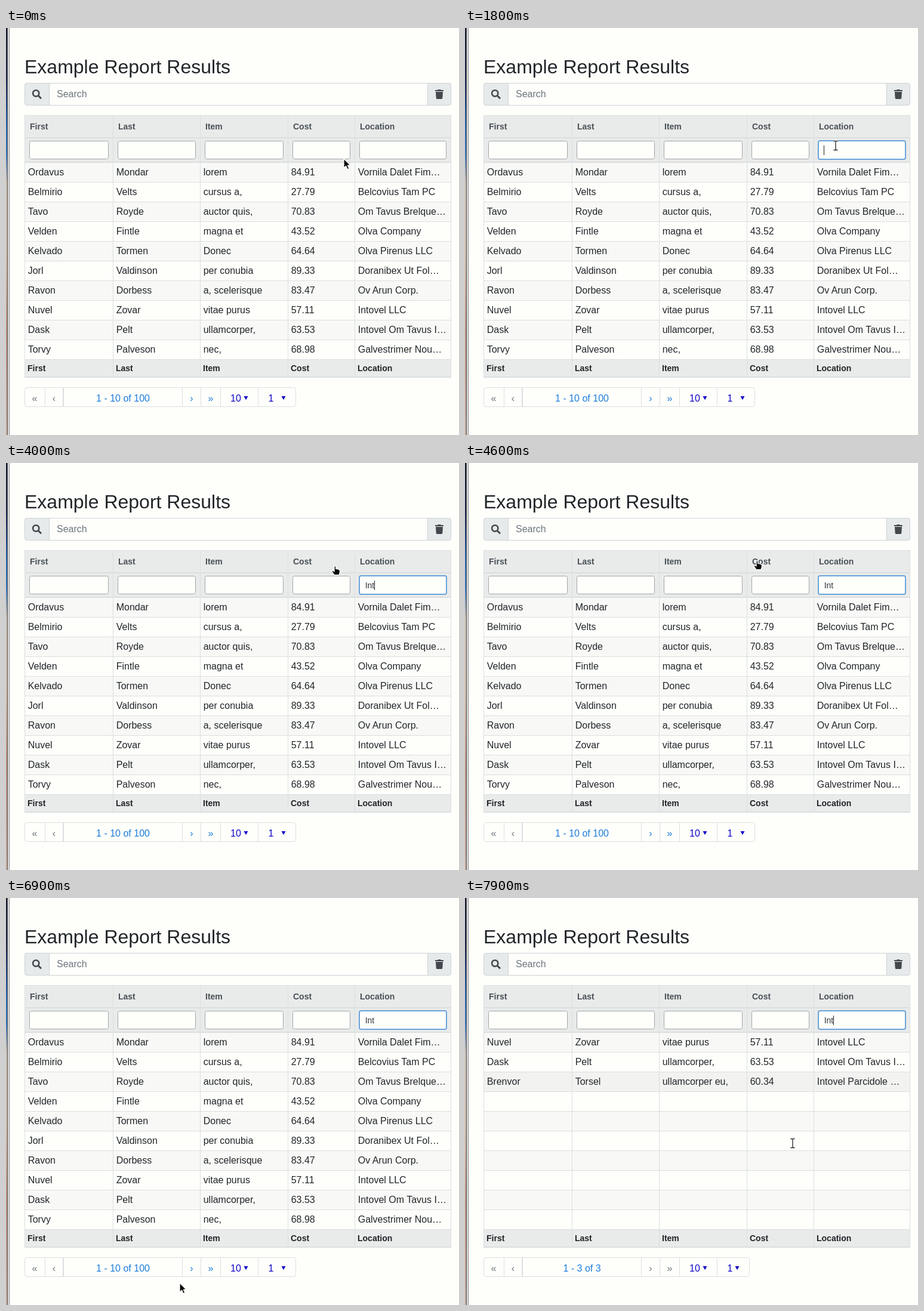
These frames come from a looping animation (759 by 682 pixels, 8000 ms). An HTML page:

```html
<!DOCTYPE html>
<html lang="en">
<head>
<meta charset="utf-8">
<title>Report table</title>
<style>
html, body { margin: 0; width: 100%; height: 100%; overflow: hidden; background: #fefffb; }
svg { display: block; width: 759px; height: 682px; font: 16px "Liberation Sans", Arial, sans-serif; fill: #212529; }
.line { fill: none; stroke: #dbdfe0; }
.shade { fill: #e9ebea; }
.icon { fill: #43484d; }
.title { font-size: 32px; }
.head { font-size: 14px; font-weight: bold; fill: #495057; }
.foot { font-size: 14px; font-weight: bold; }
.typed { font-size: 14px; fill: #33383d; }
.muted { fill: #6c757d; }
.link { fill: #1c7cdb; }
.pick { fill: #1206c8; }
.box { fill: #fefffb; stroke: #a3a6a8; }
.ring { fill: #fefffb; stroke: #6ba4da; stroke-width: 2; }
.mid { text-anchor: middle; }
</style>
</head>
<body>
<svg id="stage" viewBox="0 0 759 682">
  <defs>
    <linearGradient id="desk" x2="0" y2="1">
      <stop offset="0" stop-color="#1c2036"/>
      <stop offset=".12" stop-color="#20294c"/>
      <stop offset=".24" stop-color="#2b67b4"/>
      <stop offset=".31" stop-color="#3b78bd"/>
      <stop offset=".38" stop-color="#c9b9ab"/>
      <stop offset=".55" stop-color="#d5b8a0"/>
      <stop offset=".75" stop-color="#b98e7a"/>
      <stop offset="1" stop-color="#c4a594"/>
    </linearGradient>
  </defs>
</svg>
<script>
const stage = document.getElementById("stage");
const LOOP = 8000;
const HEADINGS = ["First", "Last", "Item", "Cost", "Location"];
const EDGES = [31, 179, 325, 472, 584, 745];
const FIELDS = [[39, 172], [187, 318], [333, 465], [480, 577], [592, 738]];
const PEOPLE = [
  "Ordavus|Mondar|lorem|84.91|Vornila Dalet Fim…",
  "Belmirio|Velts|cursus a,|27.79|Belcovius Tam PC",
  "Tavo|Royde|auctor quis,|70.83|Om Tavus Brelque…",
  "Velden|Fintle|magna et|43.52|Olva Company",
  "Kelvado|Tormen|Donec|64.64|Olva Pirenus LLC",
  "Jorl|Valdinson|per conubia|89.33|Doranibex Ut Fol…",
  "Ravon|Dorbess|a, scelerisque|83.47|Ov Arun Corp.",
  "Nuvel|Zovar|vitae purus|57.11|Intovel LLC",
  "Dask|Pelt|ullamcorper,|63.53|Intovel Om Tavus I…",
  "Torvy|Palveson|nec,|68.98|Galvestrimer Nou…",
  "Brenvor|Torsel|ullamcorper eu,|60.34|Intovel Parcidole …"
].map(line => line.split("|"));

// time, x, y, pointer, hovered row
const POINTER = [
  [0, 565, 218, "arrow"], [100, 581, 213, "arrow"], [200, 606, 207, "beam"], [300, 623, 206, "beam"],
  [600, 622, 200, "beam"], [700, 621, 197, "beam"],
  [3700, 612, 193, "beam"], [3800, 597, 182, "hand"], [3900, 575, 177, "hand"], [4000, 552, 172, "hand"],
  [4100, 533, 169, "hand"], [4200, 517, 166, "hand"], [4300, 507, 165, "hand"],
  [4500, 497, 164, "hand"], [4600, 490, 163, "hand"], [5400, 490, 161, "hand"],
  [5600, 489, 161, "hand"], [5700, 488, 162, "hand"], [5900, 470, 165, "hand"], [6000, 440, 171, "hand"],
  [6100, 409, 177, "hand"], [6200, 386, 204, "beam"], [6300, 362, 274, "beam", 1], [6400, 338, 388, "beam", 4],
  [6500, 318, 512, "beam", 8], [6600, 304, 618, "hand"], [6800, 295, 638, "arrow"], [6900, 290, 644, "arrow"],
  [7600, 313, 624, "arrow"], [7700, 372, 570, "arrow"], [7800, 462, 490, "beam"], [7900, 549, 411, "beam", 2]
];
const FOCUS_AT = 600, FILTER_AT = 7400;
const TYPE_AT = [1900, 2200, 2600];
const CARET_FLIPS = [600, 1200, 1800, 3200, 3700, 4300, 5400, 5600, 6200, 6800, 7400];
const CARET_X = [601, 605, 613, 617];
const QUERY = "Int";

function add(parent, tag, attrs, text) {
  const node = document.createElementNS("http://www.w3.org/2000/svg", tag);
  for (const key in attrs) node.setAttribute(key, attrs[key]);
  if (text !== undefined) node.textContent = text;
  return parent.appendChild(node);
}
const group = (parent = stage) => add(parent, "g", {});
const label = (parent, x, y, text, cls = "") => add(parent, "text", { x, y, class: cls }, text);
const rect = (parent, x, y, width, height, attrs) => add(parent, "rect", { x, y, width, height, ...attrs });
const path = (parent, d, attrs) => add(parent, "path", { d, ...attrs });
const show = (node, on) => node.setAttribute("visibility", on ? "visible" : "hidden");
const passed = (times, t) => times.filter(time => time <= t).length;

function drawFrame() {
  rect(stage, 0, 0, 2, 682, { fill: "url(#desk)" });
  rect(stage, 2, 0, 1, 682, { fill: "#505154" });
  rect(stage, 3, 0, 2, 682, { fill: "#e2e2e0" });
  rect(stage, 5, 0, 1, 682, { fill: "#86878a" });
  label(stage, 31, 76, "Example Report Results", "title");

  path(stage, "M72 92H35a4 4 0 0 0-4 4v30a4 4 0 0 0 4 4h37zM706 92h36a4 4 0 0 1 4 4v30a4 4 0 0 1-4 4h-36z", { fill: "#e7eaeb" });
  rect(stage, 31.5, 92.5, 714, 37, { rx: 4, class: "line", style: "stroke:#cdd2d6" });
  path(stage, "M72.5 92V130M706.5 92V130", { class: "line", style: "stroke:#cdd2d6" });
  add(stage, "circle", { cx: 50.2, cy: 109.4, r: 5.1, fill: "none", stroke: "#43484d", "stroke-width": 2.6 });
  path(stage, "M54.5 113.7L59 118.2", { stroke: "#43484d", "stroke-width": 3 });
  path(stage, "M719 104h4l1-1h4l1 1h4v2h-14zM720 107h12l-.7 10.6a1.5 1.5 0 0 1-1.5 1.4h-7.6a1.5 1.5 0 0 1-1.5-1.4z", { class: "icon" });
  label(stage, 85, 116, "Search", "muted");
}

function drawTable(body) {
  rect(stage, 31, 146, 715, 79, { class: "shade" });
  rect(stage, 31, 556, 715, 29, { class: "shade" });
  stage.append(body);
  let lines = "M31 146.5H746M31 183.5H746M31 184.5H746M31 224.5H746M31 225.5H746M31 584.5H746M31 585.5H746";
  for (let i = 1; i <= 10; i++) lines += `M31 ${225.5 + 33 * i}H746`;
  for (const x of EDGES) lines += `M${x + .5} 146V586`;
  path(stage, lines, { class: "line" });
  HEADINGS.forEach((name, i) => {
    label(stage, EDGES[i] + 9, 170, name, "head");
    label(stage, EDGES[i] + 5, 575, name, "foot");
  });
  for (const [left, right] of FIELDS)
    rect(stage, left + .5, 189.5, right - left - 1, 30, { rx: 3, class: "box" });
}

function drawRows(parent, people) {
  const view = group(parent);
  const bands = Array.from({ length: 10 }, (_, i) => {
    const band = rect(view, 31, 226 + 33 * i, 715, 33, {});
    (people[i] || []).forEach((text, c) => label(view, EDGES[c] + 5.7, 247 + 33 * i, text));
    return band;
  });
  return { view, bands };
}

function drawPager(range, right, arrowX, more) {
  const view = group();
  const next = more ? "link" : "muted";
  rect(view, 31.5, 602.5, right - 32, 32, { rx: 4, class: "line" });
  path(view, "M65.5 602V635M95.5 602V635M96.5 602V635M295.5 602V635M326.5 602V635M359.5 602V635M422.5 602V635", { class: "line" });
  [["«", 48, "muted"], ["‹", 80.5, "muted"], [range, 196, "link"], ["›", 311, next], ["»", 343, next]]
    .forEach(([text, x, cls]) => label(view, x, 626, text, cls + " mid"));
  label(view, 376, 626, "10", "pick");
  label(view, 439.5, 626, "1", "pick");
  for (const x of [402, arrowX]) path(view, `M${x - 3.5} 617h7l-3.5 6.2z`, { class: "pick" });
  return view;
}

function drawPointers() {
  const outline = { fill: "#0b0b0b", stroke: "#fff", "stroke-width": 1.2, "stroke-linejoin": "round" };
  const arrow = group(), beam = group(), hand = group();
  path(arrow, "M1 1V16.5L4.6 13.2L7 18.8L9.8 17.6L7.4 12.2H12z", outline);
  const stem = "M-3.5 -7.5H-1L0 -6.8L1 -7.5H3.5M0 -6.8V6.8M-3.5 7.5H-1L0 6.8L1 7.5H3.5";
  path(beam, stem, { fill: "none", stroke: "#fff", "stroke-width": 3.2 });
  path(beam, stem, { fill: "none", stroke: "#222", "stroke-width": 1.3 });
  path(hand, "M-2 1.5Q-.7 -.3 .8 1.5V5.4Q2.3 4.6 3.3 6Q4.8 5.4 5.6 6.7Q7.4 6.5 7.4 8.5V11.5L6 15.5H-2L-5.8 10.2Q-6 7.8-3.8 8.4L-2 10z", outline);
  return { arrow, beam, hand };
}

drawFrame();
const body = group();
const allRows = drawRows(body, PEOPLE.slice(0, 10));
const foundRows = drawRows(body, PEOPLE.filter(person => person[4].startsWith(QUERY)));
drawTable(body);
const ring = rect(stage, 592, 189, 146, 31, { rx: 3, class: "ring" });
const allPager = drawPager("1 - 10 of 100", 486, 465, true);
const foundPager = drawPager("1 - 3 of 3", 477, 456, false);
const typed = label(stage, 601.7, 210, "", "typed");
const caret = rect(stage, 601, 197, 1, 16, { fill: "#222" });
const pointers = drawPointers();

function render(t) {
  const filtered = t >= FILTER_AT;
  const [, x, y, kind, hover] = POINTER.findLast(step => step[0] <= t);
  show(allRows.view, !filtered);
  show(allPager, !filtered);
  show(foundRows.view, filtered);
  show(foundPager, filtered);
  (filtered ? foundRows : allRows).bands.forEach((band, i) =>
    band.setAttribute("fill", i === hover ? "#f2f3f0" : i % 2 ? "#fefffb" : "#f8f9f6"));

  const count = passed(TYPE_AT, t);
  show(ring, t >= FOCUS_AT);
  typed.textContent = QUERY.slice(0, count);
  caret.setAttribute("x", CARET_X[count]);
  show(caret, passed(CARET_FLIPS, t) % 2 === 1);

  for (const name in pointers) show(pointers[name], name === kind);
  pointers[kind].setAttribute("transform", `translate(${x} ${y})`);
}

const start = performance.now();
function tick() {
  render((performance.now() - start) % LOOP);
  requestAnimationFrame(tick);
}
tick();
</script>
</body>
</html>
```
